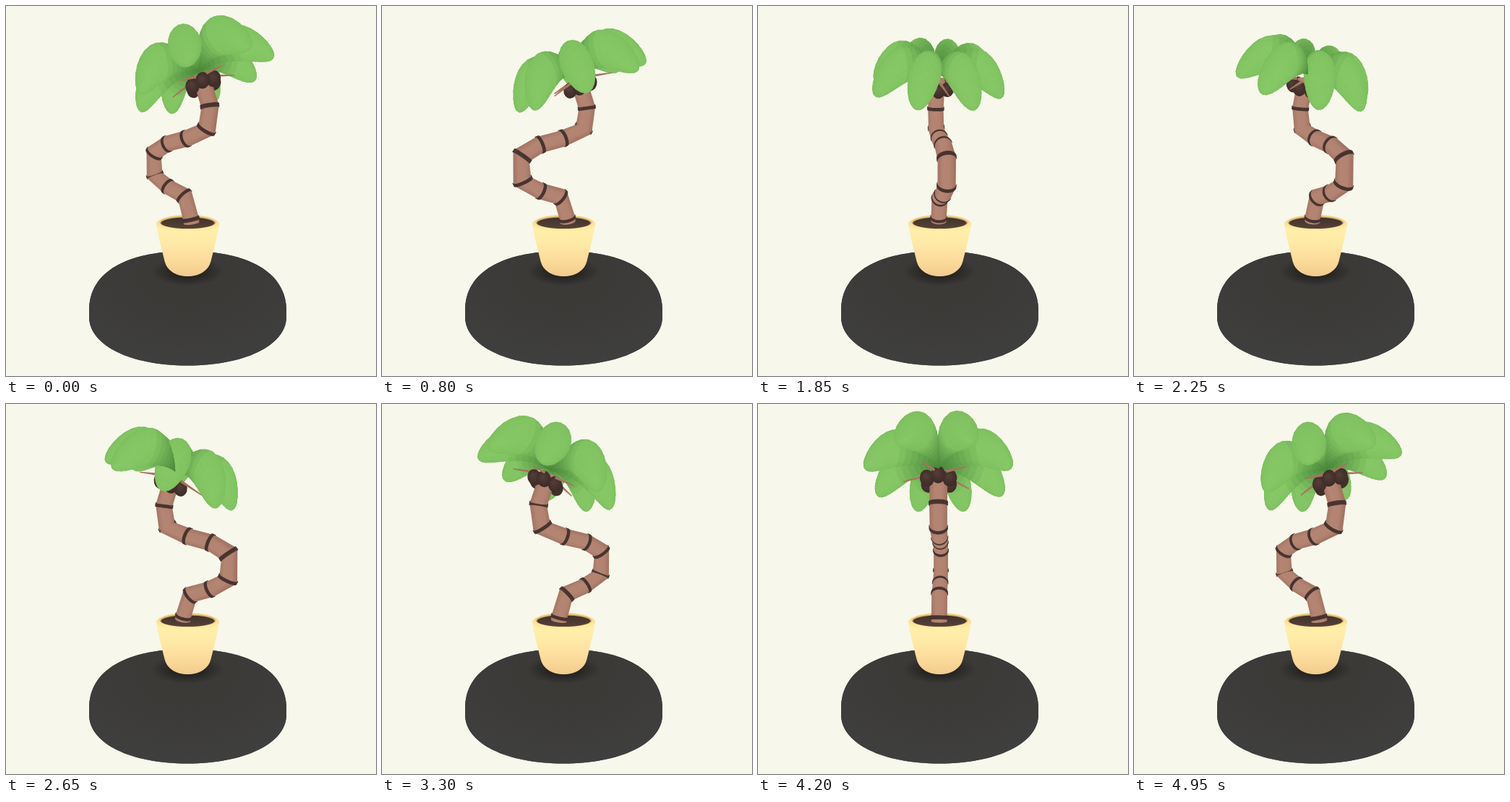
Recreate the animation shown at these times as an HTML page with a canvas. Size 512 by 512 pixels, loop 5000 ms.

```html
<!DOCTYPE html>
<html lang="en">
<head>
<meta charset="utf-8">
<title>Potted palm</title>
<style>
  html, body { margin: 0; width: 100%; height: 100%; overflow: hidden; background: #f7f7eb; }
  canvas { display: block; width: 100vw; height: 100vh; }
</style>
</head>
<body>
<canvas id="stage" width="512" height="512"></canvas>
<script>
const ctx = document.getElementById('stage').getContext('2d');
const LOOP = 5000, STEP = 50, TAU = Math.PI * 2, DEG = Math.PI / 180;
const START = -34.6 * DEG, PITCH = 10.5 * DEG, DIST = 480, CX = 251, CY = 256;
const TILT = 22 * DEG, CROWN = [-18, 157];
const TRUNK_R = 11;

// Trunk joints: offset from the axis, height
const JOINTS = [[-7, -45], [-6, -39], [5, -8], [33.5, 2.5], [58, 18], [58, 50],
  [33.5, 64], [1, 72], [-30, 85], [-34.5, 113], [-21, 150]];

let spin = 0;

const clamp = v => Math.max(0, Math.min(1, v));
const mix = (a, b, k) => `rgb(${a.map((v, i) => Math.round(v + (b[i] - v) * k))})`;

// p: along the bend of the trunk, q: across it, y: up
function view(p, y, q) {
  const c = Math.cos(spin), s = Math.sin(spin);
  const x = -p * c + q * s, z = p * s + q * c;
  return [x, y * Math.cos(PITCH) - z * Math.sin(PITCH), y * Math.sin(PITCH) + z * Math.cos(PITCH)];
}

function crown(p, h, q) {
  const c = Math.cos(TILT), s = Math.sin(TILT);
  return view(CROWN[0] + p * c + h * s, CROWN[1] + h * c - p * s, q);
}

// Azimuth 0 points against the lean of the crown
const polar = (az, rho, h) => crown(-rho * Math.cos(az), h, -rho * Math.sin(az));

function project(v) {
  const s = DIST / (DIST - v[2]);
  return [CX + v[0] * s, CY - v[1] * s, s];
}

function poly(pts, fill, edge) {
  ctx.beginPath();
  pts.forEach(p => ctx.lineTo(p[0], p[1]));
  ctx.closePath();
  ctx.fillStyle = fill;
  ctx.fill();
  if (edge) {
    ctx.strokeStyle = fill;
    ctx.lineWidth = edge;
    ctx.stroke();
  }
}

function hull(points) {
  const pts = points.slice().sort((a, b) => a[0] - b[0] || a[1] - b[1]);
  const half = list => {
    const out = [];
    for (const p of list) {
      while (out.length > 1) {
        const a = out[out.length - 2], b = out[out.length - 1];
        if ((b[0] - a[0]) * (p[1] - a[1]) - (b[1] - a[1]) * (p[0] - a[0]) > 0) break;
        out.pop();
      }
      out.push(p);
    }
    out.pop();
    return out;
  };
  return half(pts).concat(half(pts.reverse()));
}

// Mitre direction and stretch at every joint
const MITRES = JOINTS.map((j, i) => {
  const dir = (a, b) => Math.atan2(b[1] - a[1], b[0] - a[0]);
  const before = i ? dir(JOINTS[i - 1], j) : dir(j, JOINTS[1]);
  const after = i < JOINTS.length - 1 ? dir(j, JOINTS[i + 1]) : before;
  const mid = before + (after - before) * 0.6;
  return { c: Math.cos(mid), s: Math.sin(mid), wide: 1 / Math.cos((after - before) / 2) };
});

function ring(i, shift, r) {
  const [p, y] = JOINTS[i], m = MITRES[i], out = [];
  for (let k = 0; k < 28; k++) {
    const a = k / 28 * TAU, w = Math.cos(a) * r * m.wide;
    out.push(project(view(p + m.c * shift - m.s * w, y + m.s * shift + m.c * w, Math.sin(a) * r)));
  }
  return out;
}

function segment(i) {
  const a = view(JOINTS[i][0], JOINTS[i][1], 0), b = view(JOINTS[i + 1][0], JOINTS[i + 1][1], 0);
  return {
    z: (a[2] + b[2]) / 2,
    draw() {
      const A = project(a), B = project(b);
      const dx = B[0] - A[0], dy = B[1] - A[1], len = Math.hypot(dx, dy) || 1;
      const mx = (A[0] + B[0]) / 2, my = (A[1] + B[1]) / 2, w = TRUNK_R * 1.1;
      const nx = -dy / len * w, ny = dx / len * w;
      const g = ctx.createLinearGradient(mx - nx, my - ny, mx + nx, my + ny);
      g.addColorStop(0, '#a37565');
      g.addColorStop(0.3, '#b48572');
      g.addColorStop(0.7, '#b28370');
      g.addColorStop(1, '#a07161');
      const last = i === JOINTS.length - 2;
      poly(hull(ring(i, i ? 1.8 : 0, TRUNK_R).concat(ring(i + 1, last ? 0 : -1.8, TRUNK_R))), g);
    }
  };
}

// Only the wall that faces the viewer is painted
function band(i) {
  return {
    z: view(JOINTS[i][0], JOINTS[i][1], 0)[2],
    draw() {
      const low = ring(i, -2.4, TRUNK_R + 0.5), up = ring(i, 2.4, TRUNK_R + 0.5);
      low.forEach((a, k) => {
        const n = (k + 1) % low.length, b = low[n], c = up[n], d = up[k];
        const area = (c[0] - a[0]) * (d[1] - b[1]) - (c[1] - a[1]) * (d[0] - b[0]);
        if (area > 0) poly([a, b, c, d], '#46332f', 0.6);
      });
    }
  };
}

// A plump drop that swells outward along a drooping arc
function leaf(az) {
  const N = 18, M = 20, LEN = 92, HALF_W = 18, HALF_H = 23;
  const c = -Math.cos(az), s = -Math.sin(az);
  const at = (u, phi) => {
    const size = 2.6 * u * Math.sqrt(1 - u);
    const rho = LEN * u, w = HALF_W * size * Math.cos(phi);
    const h = 80 * u - 94 * u * u + HALF_H * size * Math.sin(phi);
    return crown(rho * c - w * s, h, rho * s + w * c);
  };
  return {
    z: at(0.5, 0)[2],
    draw() {
      const cells = [];
      const us = Array.from({ length: N + 1 }, (_, i) => (1 - Math.cos(Math.PI * i / N)) / 2);
      const grid = us.map(u => Array.from({ length: M + 1 }, (_, j) => at(u, j / M * TAU)));
      for (let i = 0; i < N; i++) for (let j = 0; j < M; j++) {
        const q = [grid[i][j], grid[i + 1][j], grid[i + 1][j + 1], grid[i][j + 1]];
        const face = facing(q);
        if (face > 0) cells.push({ q, face, u: (us[i] + us[i + 1]) / 2, z: (q[0][2] + q[2][2]) / 2 });
      }
      cells.sort((a, b) => a.z - b.z);
      for (const { q, face, u } of cells) {
        const light = clamp(u * 1.7 - 0.05) * (0.82 + 0.18 * face);
        poly(q.map(project), mix([76, 138, 60], [134, 200, 101], light), 0.9);
      }
    }
  };
}

// Cosine between a patch's outward normal and the eye
function facing(q) {
  const sub = (a, b) => a.map((v, i) => v - b[i]);
  const e = sub(q[3], q[1]), f = sub(q[2], q[0]);
  const n = [e[1] * f[2] - e[2] * f[1], e[2] * f[0] - e[0] * f[2], e[0] * f[1] - e[1] * f[0]];
  const eye = [-q[1][0], -q[1][1], DIST - q[1][2]];
  const dot = n.reduce((t, v, i) => t + v * eye[i], 0);
  return dot / (Math.hypot(...n) * Math.hypot(...eye) || 1);
}

function coconut(az) {
  const c = polar(az, 16, -18);
  return {
    z: c[2],
    draw() {
      const [x, y, s] = project(c);
      const g = ctx.createRadialGradient(x - 2, y - 3, 1, x, y, 11 * s);
      g.addColorStop(0, '#533d37');
      g.addColorStop(1, '#3b2925');
      ctx.fillStyle = g;
      ctx.beginPath();
      ctx.ellipse(x, y, 8.8 * s, 10.3 * s, (x - CX) * 0.008, 0, TAU);
      ctx.fill();
    }
  };
}

function stem(az) {
  const a = polar(az, 12, -9), b = polar(az, 45, -16);
  return {
    z: (a[2] + b[2]) / 2 + 3,
    draw() {
      const A = project(a), B = project(b);
      const dx = B[0] - A[0], dy = B[1] - A[1], len = Math.hypot(dx, dy) || 1;
      const nx = -dy / len, ny = dx / len;
      poly([[A[0] + nx * 2, A[1] + ny * 2], [B[0] + nx * 0.7, B[1] + ny * 0.7],
        [B[0] - nx * 0.7, B[1] - ny * 0.7], [A[0] - nx * 2, A[1] - ny * 2]], '#a5745f');
    }
  };
}

function glow(x, y, rx, ry, stops) {
  const g = ctx.createRadialGradient(0, 0, 0, 0, 0, 1);
  stops.forEach(([k, c]) => g.addColorStop(k, c));
  ctx.save();
  ctx.translate(x, y);
  ctx.scale(rx, ry);
  ctx.fillStyle = g;
  ctx.fillRect(-2, -2, 4, 4);
  ctx.restore();
}

function vertical(y0, y1, ...colors) {
  const g = ctx.createLinearGradient(0, y0, 0, y1);
  colors.forEach((c, i) => g.addColorStop(i / (colors.length - 1), c));
  return g;
}

function oval(x, y, rx, ry, fill) {
  ctx.fillStyle = fill;
  ctx.beginPath();
  ctx.ellipse(x, y, rx, ry, 0, 0, TAU);
  ctx.fill();
}

const PLATE = new Path2D('M115 418C117 362 178 339 251 339S385 362 388 418L388 432C386 470 330 497.500 251 497.500S117 470 115 432Z');
const POT = new Path2D('M208 301C208.500 308 211 317 213 327L219.500 353C223 367 236 374 251.500 374S280 367 283.500 353L290 327C292 317 294.500 308 295 301Z');

function drawBase() {
  ctx.fillStyle = '#f7f7eb';
  ctx.fillRect(0, 0, 512, 512);
  ctx.fillStyle = '#3f3f3f';
  ctx.fill(PLATE);
  ctx.save();
  ctx.clip(PLATE);
  glow(251, 375, 210, 126, [[0, '#3a3936'], [0.5, '#3c3b39'], [1, '#3f3f3f']]);
  glow(251, 367, 50, 20, [[0, '#201f1d'], [0.5, 'rgba(32,31,29,.7)'], [1, 'rgba(32,31,29,0)']]);
  ctx.restore();
  ctx.fillStyle = vertical(300, 374, '#fff1ab', '#feeba7', '#fddd9d', '#f0cb8c');
  ctx.fill(POT);
  oval(251.5, 301.5, 43.5, 12.5, vertical(289, 314, '#efcf84', '#fae39a', '#fff0a9'));
  oval(251.5, 299.8, 39, 8.8, vertical(291, 309, '#cfa468', '#e0b878'));
  oval(251.5, 300.2, 37, 7.8, vertical(293, 308, '#41322a', '#55423a'));
}

const ring6 = Array.from({ length: 6 }, (_, i) => i * 60 * DEG);
const ring8 = Array.from({ length: 8 }, (_, i) => (22.5 + i * 45) * DEG);
const ring5 = Array.from({ length: 5 }, (_, i) => (-95 + i * 72) * DEG);

function render(t) {
  spin = START + t / LOOP * TAU;
  drawBase();
  const parts = [...ring8.map(leaf), ...ring6.map(coconut), ...ring5.map(stem)];
  for (let i = 0; i < JOINTS.length - 1; i++) {
    parts.push(segment(i));
    if (i) parts.push(band(i));
  }
  parts.sort((a, b) => a.z - b.z).forEach(p => p.draw());
}

let t0 = null;
function tick(now) {
  if (t0 === null) t0 = now;
  render(Math.floor((now - t0) % LOOP / STEP) * STEP);
  requestAnimationFrame(tick);
}
render(0);
requestAnimationFrame(tick);
</script>
</body>
</html>
```
